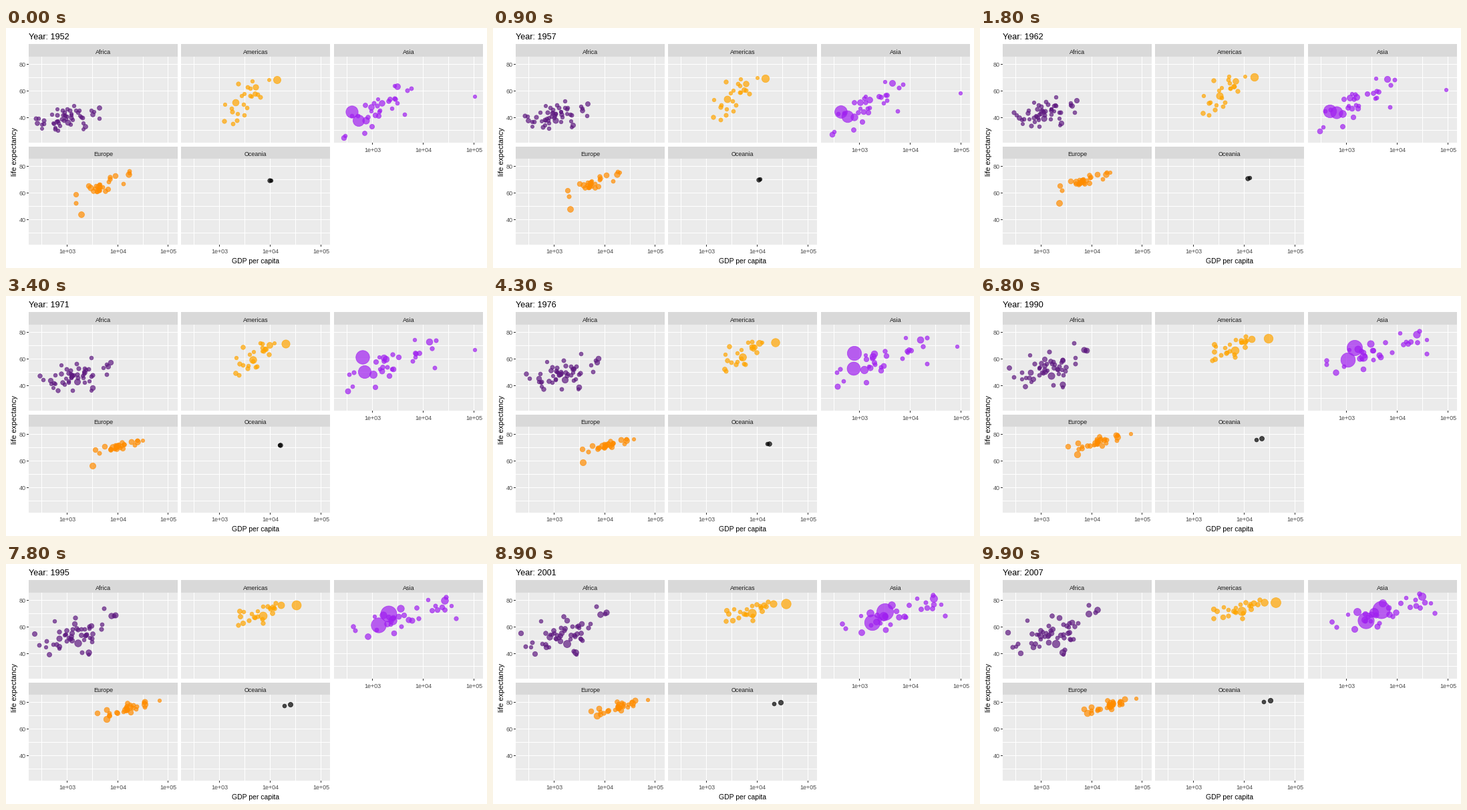
Write a matplotlib script that moves like this. It is 720 by 360 pixels and loops after 10000 ms.

```python
import matplotlib.pyplot as plt
import numpy as np
from matplotlib.animation import FuncAnimation
from matplotlib.patches import Rectangle

W, H, FRAMES = 720, 360, 100
PANEL_W, PANEL_H = 223, 129
LEFT = (34, 262.1, 491.1)
TOP = (43.6, 196.8)
KEYS = (1952, 1962, 1972, 1992, 2007)

plt.rcParams["font.family"] = "Liberation Sans"

# name: column, row, colour, yearly population growth
PANELS = {
    "Africa": (0, 0, "#5E1A80", 0.025),
    "Americas": (1, 0, "#FFA500", 0.017),
    "Asia": (2, 0, "#A020F0", 0.0165),
    "Europe": (0, 1, "#FF8C00", 0.006),
    "Oceania": (1, 1, "#000000", 0.015),
}

time = np.linspace(KEYS[0], KEYS[-1], FRAMES)
age = (time - KEYS[0]) / (KEYS[-1] - KEYS[0])
xs, ys, radii, colors = [], [], [], []


def px(col, log_gdp):
    return LEFT[col] + (log_gdp - 2.2487) * 75.75


def py(row, life):
    return TOP[row] + (85.55 - life) * 1.987


def over_time(values):
    return np.interp(time, KEYS, values)


def add(panel, pop, log_gdp, life):
    """One dot; pop is the final population in millions."""
    col, row, color, growth = PANELS[panel]
    people = pop * np.exp(-growth * (KEYS[-1] - time))
    size = 2 + 10 * np.sqrt(people / 1319)
    xs.append(np.round(px(col, log_gdp)))
    ys.append(np.round(py(row, life)))
    radii.append(0.375 * (2.845 * size + 0.945) - 0.15)
    colors.append(color)


def landmark(panel, pop, gdp, life):
    add(panel, pop, over_time(np.log10(gdp)), over_time(life))


def crowd(panel, count, pop, tie, gdp, gdp_sd, life, life_sd, seed):
    """Random dots following the panel's mean and spread; tie links both axes."""
    rng = np.random.default_rng(seed)
    draws = np.clip(rng.standard_normal((5, count)), -2, 2)
    draws -= draws.mean(axis=1, keepdims=True)
    draws /= draws.std(axis=1, keepdims=True)
    turn = 0.7 * age
    for rich, rich2, well, well2, big in draws.T:
        z = rich * np.cos(turn) + rich2 * np.sin(turn)
        e = well * np.cos(turn) + well2 * np.sin(turn)
        health = tie * z + np.sqrt(1 - tie ** 2) * e
        add(panel, pop * np.exp(big),
            over_time(gdp) + over_time(gdp_sd) * z,
            over_time(life) + over_time(life_sd) * health)


crowd("Africa", 51, 9, 0.5, seed=4,
      gdp=(2.99, 3.08, 3.19, 3.17, 3.25), gdp_sd=(0.31, 0.3, 0.34, 0.37, 0.43),
      life=(39.2, 43.4, 47.5, 53.7, 55), life_sd=(5, 5.7, 6.3, 8.5, 9.3))
crowd("Americas", 23, 9, 0.6, seed=7,
      gdp=(3.51, 3.59, 3.72, 3.78, 3.91), gdp_sd=(0.22, 0.22, 0.22, 0.24, 0.28),
      life=(52.8, 58, 62.2, 69.4, 73.4), life_sd=(8.9, 8.2, 7, 5, 4.2))
crowd("Asia", 28, 18, 0.72, seed=11,
      gdp=(3.14, 3.24, 3.42, 3.62, 3.76), gdp_sd=(0.34, 0.39, 0.5, 0.55, 0.54),
      life=(46, 51.3, 56.8, 66.2, 70.4), life_sd=(9, 9.3, 9.3, 7.8, 7.6))
crowd("Europe", 29, 10, 0.82, seed=3,
      gdp=(3.71, 3.87, 4.05, 4.16, 4.36), gdp_sd=(0.26, 0.23, 0.21, 0.28, 0.23),
      life=(65.1, 69.2, 71.2, 74.7, 77.8), life_sd=(4.8, 2.8, 2, 3, 2.7))

landmark("Africa", 135, (1077, 1151, 1698, 1620, 2014), (36, 39, 43, 47.5, 47))
landmark("Americas", 190, (2109, 3337, 4986, 6950, 9066), (51, 56, 59.5, 67, 72))
landmark("Americas", 301, (13990, 16173, 21806, 32004, 42952),
         (68.4, 70.2, 71.3, 76, 78.2))
landmark("Asia", 1319, (400, 488, 677, 1656, 4959), (44, 44.5, 63, 68.7, 73))
landmark("Asia", 1110, (547, 658, 724, 1164, 2452), (37.4, 43.6, 50.7, 60, 64.7))
landmark("Asia", 223, (750, 849, 1111, 2383, 3541), (37.5, 42.5, 49, 62.7, 70.7))
landmark("Asia", 127, (3217, 6577, 14779, 26825, 31656), (63, 68.7, 73.4, 79, 82.6))
landmark("Asia", 2.5, (108382, 95458, 109348, 34933, 47307),
         (55.6, 60.5, 67.7, 75, 77.6))
landmark("Europe", 71, (1969, 2323, 3451, 5678, 8458), (43.6, 52, 57, 66, 71.8))
landmark("Oceania", 20, (10040, 12217, 16789, 23425, 34435),
         (69.1, 70.9, 71.9, 77.6, 81.2))
landmark("Oceania", 4, (10557, 13176, 16046, 18363, 25185),
         (69.4, 71.2, 71.9, 76.3, 80.2))

xs, ys, radii = (np.array(a).T for a in (xs, ys, radii))

fig = plt.figure(figsize=(W / 72, H / 72), dpi=72, facecolor="white")
ax = fig.add_axes([0, 0, 1, 1])
ax.set(xlim=(0, W), ylim=(H, 0))
ax.axis("off")


def box(x, y, w, h, color):
    ax.add_patch(Rectangle((x, y), w, h, color=color, lw=0, aa=False))


def label(x, y, text, size=9, color="#4D4D4D", ha="center", **kw):
    return ax.text(x, y, text, size=size, color=color, ha=ha, **kw)


def draw_panel(name, col, row):
    x, y = int(LEFT[col]), int(TOP[row])
    bottom = y + PANEL_H
    box(x, y - 19 + row, PANEL_W, 19 - row, "#D9D9D9")
    box(x, y, PANEL_W, PANEL_H, "#EBEBEB")
    label(x + PANEL_W / 2, y - 4.3, name, color="#1A1A1A")
    for life in range(30, 90, 10):
        gy = int(py(row, life))
        box(x, gy, PANEL_W, 1, "white")
        if col == 0 and life % 20 == 0:
            box(x - 3, gy, 3, 1, "#333333")
            label(x - 4.5, gy + 4, life, ha="right")
    for half in range(5, 11):
        gx = round(px(col, half / 2))
        box(gx, y, 1, PANEL_H, "white")
        if half % 2 == 0 and (row == 1 or col == 2):
            box(gx, bottom, 1, 3, "#333333")
            label(gx + 0.5, bottom + 13.5, f"1e+{half // 2:02d}")


for name, (col, row, *_) in PANELS.items():
    draw_panel(name, col, row)

title = label(33.5, 17, "", 12.6, "black", "left")
label(374, 353, "GDP per capita", 10.4, "black")
label(13, 185, "life expectancy", 11, "black", rotation=90, va="center")

dots = ax.scatter(xs[0], ys[0], facecolors=colors, edgecolors="face",
                  alpha=0.7, linewidths=0.8, zorder=3)


def update(i):
    title.set_text(f"Year: {round(time[i])}")
    dots.set_offsets(np.column_stack([xs[i], ys[i]]))
    dots.set_sizes((2 * radii[i]) ** 2)
    return title, dots


anim = FuncAnimation(fig, update, frames=FRAMES, interval=100,
                     repeat=True, repeat_delay=0)
plt.show()
```
